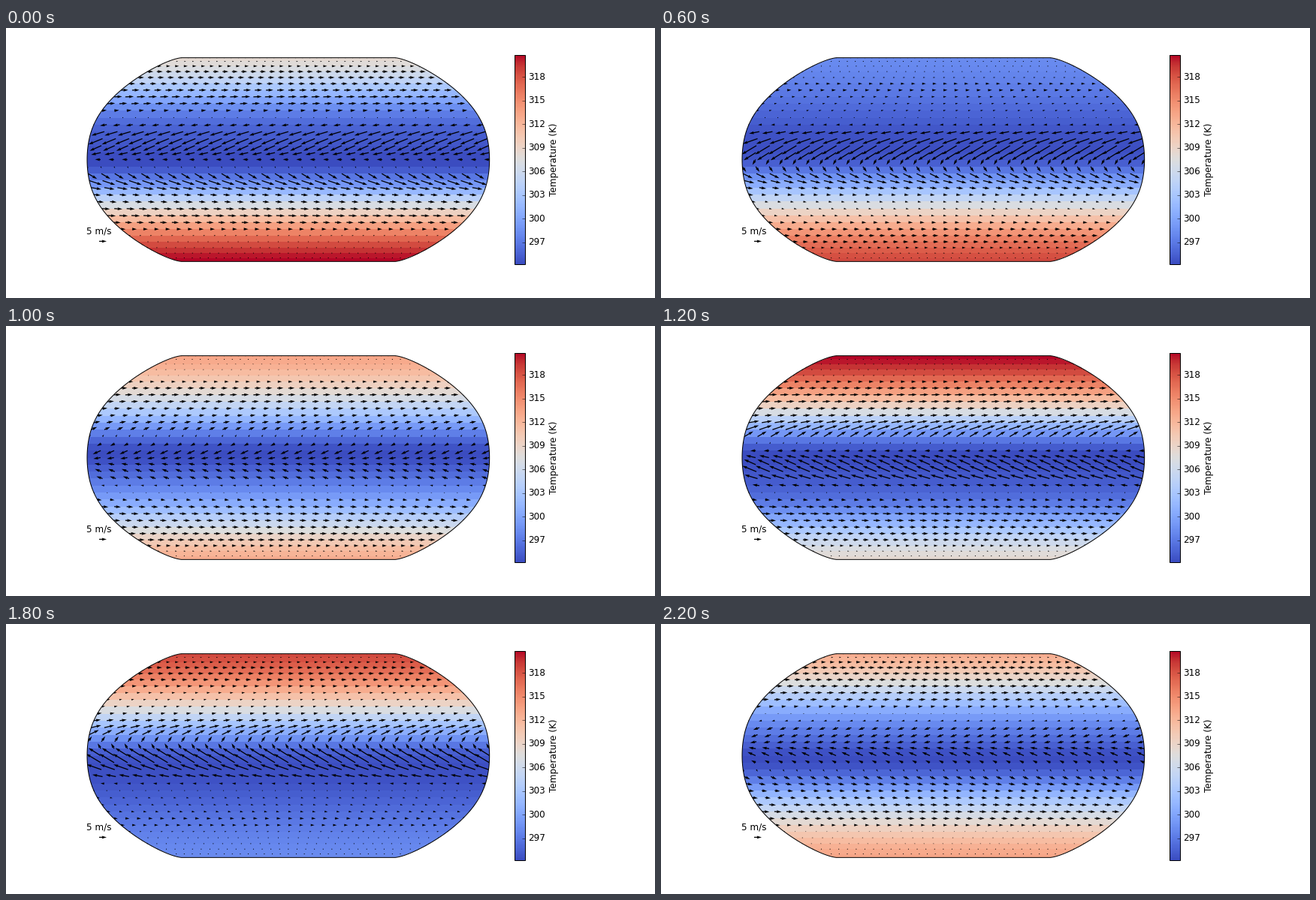
Write a matplotlib script that moves like this. It is 864x360 px and loops after 2.4 s.

```python
import numpy as np
import matplotlib.pyplot as plt
from matplotlib.animation import FuncAnimation
from matplotlib.patches import Polygon

W, H, DPI = 864, 360, 72
CX, CY, RX, RY = 375.84, 175.5, 267.84, 135.85
FRAMES, LOOP = 12, 2400
ROW_STEP, COL_STEP = 5.54, 12  # degrees

plt.rcParams.update({"font.family": "DejaVu Sans", "font.size": 12})

# Robinson projection: even polynomials through a few key latitudes
KEYS = (np.array([0, 30, 45, 60, 75, 90]) / 90) ** 2
WIDTH = np.polyfit(KEYS, [1, .96, .8962, .7986, .6732, .5322], 5)
RISE = np.polyfit(KEYS, [1.116, 1.116, 1.1142, 1.1019, 1.0723, 1], 5)


def project(lon, lat):
    """Longitude in 0..360 and latitude to stage pixels, y down."""
    s = lat / 90
    x = CX + RX * np.polyval(WIDTH, s * s) * (lon / 180 - 1)
    y = CY - RY * np.polyval(RISE, s * s) * s
    return x, y


# Each row of arrows sits on the north edge of its band
rows = np.arange(-15, 17)
mid = rows - .5
m = np.abs(mid)
south = -np.sign(mid)
sin_lat = np.sin(np.radians(ROW_STEP * m))


def bump(center, width):
    return np.exp(-((m - center) / width) ** 2)


def climate(i):
    """Temperature (K) and wind (m/s) per row, as seasonal harmonics."""
    t = 2 * np.pi * i / FRAMES
    c, s, c2 = np.cos(t), np.sin(t), np.cos(2 * t)
    temp = (294.5 + 17 * sin_lat ** 1.6 + (3.5 * sin_lat ** 3 - .4) * c2
            + south * (6.2 * (1 - np.exp(-(ROW_STEP * m / 30) ** 2.3)) * c
                       + 10.2 * sin_lat ** 1.1 * s))
    u = (3.9 * bump(8.8, 4.2) - 5.3 * bump(0, 2.6) + 1.9 * bump(8, 1.8) * c2
         + south * ((8.7 * bump(3.2, 2) - 2.1 * bump(12.5, 1.7)) * c
                    + (8.1 * bump(2.6, 2.1) + 1.7 * bump(12.5, 1.8)) * s))
    v = (south * (1.3 * bump(1.2, 1) - .35 * bump(6.5, 3))
         - 3.7 * bump(2.6, 1.6) * c - 4.8 * bump(1.2, 2.1) * s)
    return temp, u, v


fig = plt.figure(figsize=(W / DPI, H / DPI), dpi=DPI, facecolor="white")
ax = fig.add_axes([0, 0, 1, 1])
ax.set(xlim=(0, W), ylim=(H, 0))
ax.axis("off")

lat = np.linspace(-90, 90, 181)
left, ys = project(0, lat)
right, _ = project(360, lat)
outline = np.column_stack([np.r_[left, right[::-1]], np.r_[ys, ys[::-1]]])
border = Polygon(outline, fill=False, ec="black", lw=1, zorder=4)
ax.add_patch(border)

edge_lat = np.clip(ROW_STEP * np.arange(-16, 17), -90, 90)
edge_lat[[0, -1]] = -90, 90
mesh = ax.pcolormesh([CX - RX - 2, CX + RX + 2], project(0, edge_lat)[1],
                     np.zeros((len(rows), 1)), cmap="coolwarm",
                     vmin=294.24, vmax=320.76)
mesh.set_clip_path(border)

px, py = project(*np.meshgrid(np.arange(0, 361, COL_STEP), edge_lat[1:]))
zero = np.zeros(px.shape)
arrows = dict(angles="uv", units="dots", scale_units="dots",
              scale=.5, width=1.29, zorder=3)
wind = ax.quiver(px, py, zero, zero, **arrows)
wind.set_clip_path(border)
ax.quiver([124], [284.4], [5], [0], **arrows)
ax.text(123.6, 274.3, "5 m/s", ha="center", va="baseline")

cax = fig.add_axes([677.2 / W, .125, 14 / W, .775])
bar = fig.colorbar(mesh, cax=cax, ticks=np.arange(297, 319, 3))
bar.outline.set_linewidth(1)
cax.tick_params(direction="in", length=4, width=.5, pad=4)
for label in cax.get_yticklabels():
    label.set_va("center")
fig.text(729 / W, 1 - CY / H, "Temperature (K)", rotation=90,
         ha="center", va="center")


def draw(i):
    temp, u, v = climate(i)
    mesh.set_array(temp[:, None])
    wind.set_UVC(u[:, None] + zero, v[:, None] + zero)
    return mesh, wind


anim = FuncAnimation(fig, draw, frames=FRAMES, interval=LOOP / FRAMES,
                     repeat=True, repeat_delay=0, blit=False)
plt.show()
```
